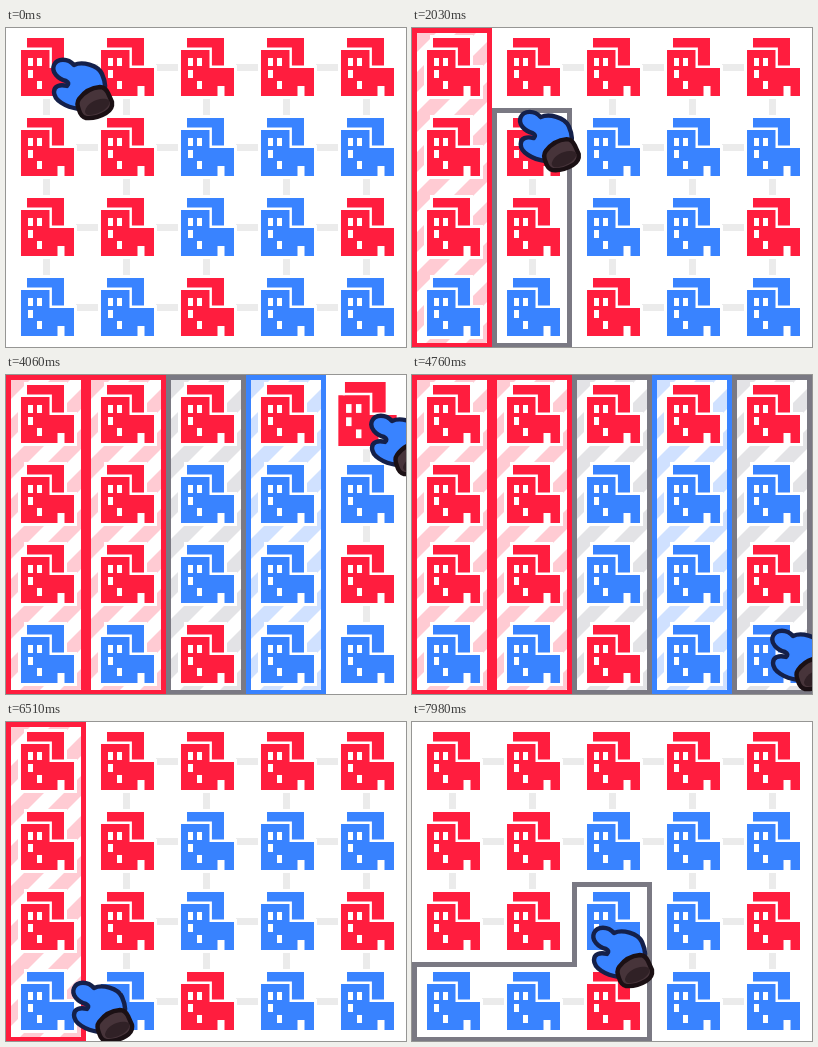
An HTML page with a canvas for the animation above (8000 ms loop, 400 px wide and 319 px high).

```html
<!DOCTYPE html>
<html lang="en">
<head>
<meta charset="utf-8">
<title>Drawing districts</title>
<style>
html, body { margin: 0; width: 100%; height: 100%; overflow: hidden; background: #fff; }
canvas { display: block; }
</style>
</head>
<body>
<canvas id="stage" width="400" height="319"></canvas>
<script>
const ctx = document.getElementById('stage').getContext('2d');
const LOOP = 8000, STEP = 70, CELL = 80, COLS = 5, ROWS = 4, EDGE = 5;
const MAP = ['RRRRR', 'RRBBB', 'RRBBR', 'BBRBB'];
const COLOR = { R: '#ff1d3e', B: '#3983ff', N: '#7a7983' };
const TINT = { R: '#ffcbd3', B: '#d0e1ff', N: '#e3e3e6' };

// One stroke per column, alternately down and up
const STROKES = [
  { press: 490, release: 1400, from: [36, 24], toX: 40 },
  { press: 1680, release: 2310, from: [125, 250], toX: 98 },
  { press: 2520, release: 3080, from: [220, 22], toX: 215 },
  { press: 3290, release: 3920, from: [265, 249], toX: 237 },
  { press: 4130, release: 4760, from: [363, 39], toX: 358 }
];
const ERASE_X = [65, 130, 206, 293, 343];
const eraseTime = col => 6650 - 280 * col;

const path = [{ t: 0, x: 45, y: 30 }];
const drags = [];

// Rest until leave, then glide until arrive
function move(leave, arrive, x, y) {
  path.push({ ...path[path.length - 1], t: leave }, { t: arrive, x, y });
}

STROKES.forEach(({ press, release, from, toX }, col) => {
  const hop = col ? STROKES[col - 1].release - STEP : 0;
  move(hop, hop + 2 * STEP, ...from);
  move(Math.max(press, release - 700), release - 2 * STEP, toX, from[1] < 160 ? 254 : 15);
  drags.push({ press, release, erase: eraseTime(col) });
});
for (let col = COLS - 1; col >= 0; col--) {
  const arrive = eraseTime(col) - 2 * STEP;
  move(arrive - 3 * STEP, arrive, ERASE_X[col], 259);
}
move(6650, 7000, 90, 85);
move(7070, 7490, 20, 254);
move(7560, 7770, 100, 262);
move(7770, 7910, 186, 252);
move(7910, 7980, 179, 204);
drags.push({ press: 7630, release: LOOP, erase: LOOP });

function handAt(t) {
  const next = path.findIndex(p => p.t > t);
  if (next < 0) return path[path.length - 1];
  const a = path[next - 1], b = path[next], u = (t - a.t) / (b.t - a.t);
  return { x: a.x + (b.x - a.x) * u, y: a.y + (b.y - a.y) * u };
}

function cellAt(t) {
  const { x, y } = handAt(t);
  return Math.floor((y + 18) / CELL) * COLS + Math.floor((x + 6) / CELL);
}

function districtsAt(t) {
  return drags.filter(d => t >= d.press && t < d.erase).map(({ press, release }) => {
    const cells = new Set();
    for (let s = press; s <= t && s < release; s += STEP) cells.add(cellAt(s));
    return { cells, done: t >= release };
  });
}

const spot = n => [n % COLS, Math.floor(n / COLS)];
const kind = n => MAP[Math.floor(n / COLS)][n % COLS];

function rect(color, x, y, w, h) {
  ctx.fillStyle = color;
  ctx.fillRect(x, y, w, h);
}

function winner(cells) {
  const lead = [...cells].reduce((sum, n) => sum + (kind(n) === 'R' ? 1 : -1), 0);
  return lead > 0 ? 'R' : lead < 0 ? 'B' : 'N';
}

function drawStripes(color, x, y) {
  ctx.save();
  ctx.beginPath();
  ctx.rect(x, y, CELL, CELL);
  ctx.clip();
  rect('#fff', x, y, CELL, CELL);
  ctx.fillStyle = color;
  for (let s = 9; s < 2 * CELL; s += 40) {
    ctx.beginPath();
    ctx.moveTo(x + s, y);
    ctx.lineTo(x + s + 20, y);
    ctx.lineTo(x + s + 20 - CELL, y + CELL);
    ctx.lineTo(x + s - CELL, y + CELL);
    ctx.fill();
  }
  ctx.restore();
}

function drawDistrict({ cells, done }) {
  const side = done ? winner(cells) : 'N';
  for (const n of cells) {
    const [c, r] = spot(n), x = c * CELL, y = r * CELL;
    if (done) drawStripes(TINT[side], x, y);
    for (let dx = -1; dx <= 1; dx++) for (let dy = -1; dy <= 1; dy++) {
      const inside = c + dx >= 0 && c + dx < COLS && cells.has(n + dx + dy * COLS);
      if (inside) continue;
      rect(COLOR[side],
        x + (dx > 0 ? CELL - EDGE : 0), y + (dy > 0 ? CELL - EDGE : 0),
        dx ? EDGE : CELL, dy ? EDGE : CELL);
    }
  }
}

const shell = new Path2D('M21 10H58V40H68V68H15V22H21Z');
const seam = new Path2D('M19 20.8H44.7V38.8H60');

function drawBuilding(n, big) {
  const [c, r] = spot(n);
  ctx.save();
  ctx.translate(c * CELL, r * CELL);
  if (big) {
    ctx.translate(41.5, 39);
    ctx.scale(1.1, 1.1);
    ctx.translate(-41.5, -39);
  }
  ctx.strokeStyle = '#fff';
  ctx.lineWidth = 6;
  ctx.stroke(shell);
  ctx.fillStyle = COLOR[kind(n)];
  ctx.fill(shell);
  ctx.lineWidth = 2.4;
  ctx.stroke(seam);
  for (const [x, y] of [[22, 30], [31, 30], [22, 42], [31, 53]]) rect('#fff', x, y, 5, 8);
  rect('#fff', 51.5, 58, 7, 10);
  ctx.restore();
}

function drawLinks(districts) {
  const owner = n => districts.findIndex(d => d.cells.has(n));
  for (let n = 0; n < COLS * ROWS; n++) {
    const [c, r] = spot(n);
    if (c < COLS - 1 && owner(n) === owner(n + 1))
      rect('#ebebeb', c * CELL + 70, r * CELL + 36, 23, 7);
    if (r < ROWS - 1 && owner(n) === owner(n + COLS))
      rect('#ebebeb', c * CELL + 37, r * CELL + 70, 7, 18);
  }
}

const mitten = new Path2D('M15 24C7 22 0 15 3 8C6 1 17 1 23 8C31 4 47 8 51 17C55 26 55 32 52 40L28 52C14 50 3 43 3 35C3 29 9 27 16 29Q19 26 15 24Z');
const cuff = new Path2D('M28 42Q36 31 49 30Q54 30 57 36L61 45Q62 52 55 56Q45 62 35 61Q30 60 28 53Q25 46 28 42Z');
const opening = new Path2D('M34 54C36 45 50 39 58 43C61 50 48 58 37 58Q34 57 34 54Z');

function drawHand({ x, y }) {
  ctx.save();
  ctx.translate(x, y - 1);
  ctx.lineJoin = 'round';
  ctx.lineWidth = 4.4;
  for (const [shape, fill, line] of [[mitten, COLOR.B, '#14204a'], [cuff, '#47343a', '#1b1014']]) {
    ctx.fillStyle = fill;
    ctx.strokeStyle = line;
    ctx.fill(shape);
    ctx.stroke(shape);
  }
  ctx.fillStyle = '#302126';
  ctx.fill(opening);
  ctx.restore();
}

function draw(now) {
  const t = Math.floor(now % LOOP / STEP) * STEP;
  const districts = districtsAt(t);
  const hover = t > 1000 ? cellAt(t) : -1;
  rect('#fff', 0, 0, 400, 319);
  drawLinks(districts);
  districts.forEach(drawDistrict);
  for (let n = 0; n < COLS * ROWS; n++)
    drawBuilding(n, n === hover && !districts.some(d => d.cells.has(n)));
  drawHand(handAt(t));
}

const start = performance.now();
function tick() {
  draw(performance.now() - start);
  requestAnimationFrame(tick);
}
tick();
</script>
</body>
</html>
```
